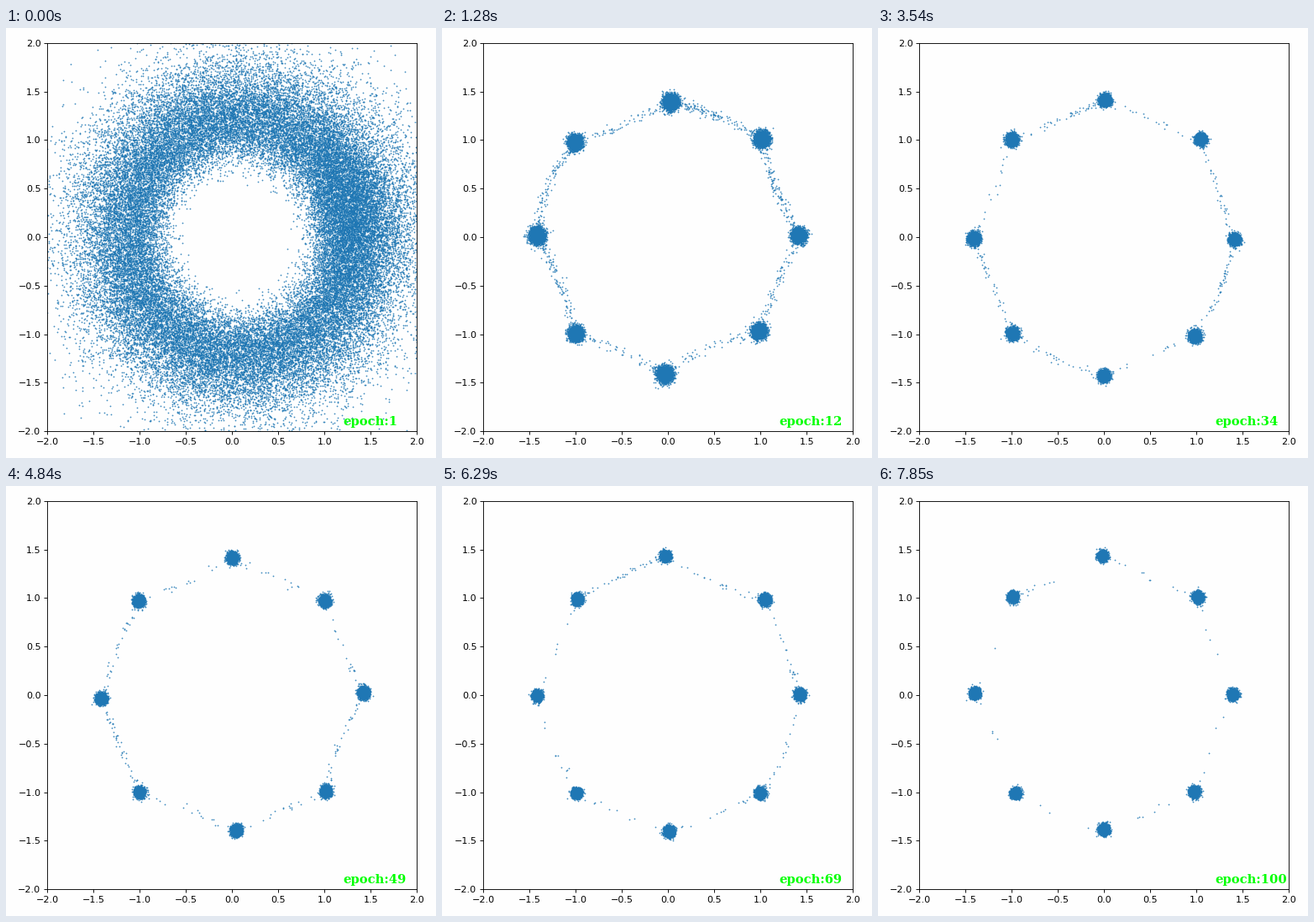
Animation, 512 px wide and 512 px high, one loop 8890 ms. Source, as a matplotlib script:

```python
import numpy as np
import matplotlib.pyplot as plt
from matplotlib.animation import FuncAnimation

SIZE, DPI = 512, 80
TICK_MS, LOOP_TICKS = 10, 889
LAST = 100
MODES, PER_MODE = 8, 2500

# The pace picks up from 12 to 4 ticks per epoch, then the last epoch holds.
holds = 12 - ((np.arange(1, LAST) + 4.2) // 11.86).astype(int)
holds = np.append(holds, LOOP_TICKS - holds.sum())
EPOCHS = np.repeat(np.arange(1, LAST + 1), holds)

angles = np.arange(MODES) * 2 * np.pi / MODES
RING = np.sqrt(2) * np.column_stack([np.cos(angles), np.sin(angles)])


def noisy_ring(rng, n=50000):
    """Untrained generator: a broad ring, denser on the right."""
    theta = rng.uniform(0, 2 * np.pi, n)
    dense = rng.random(n) < 0.1
    theta[dense] = rng.normal(0.22, 0.4, dense.sum())
    r = 1.31 * np.exp(rng.normal(0, 0.22, n))
    return np.column_stack([0.09 + r * np.cos(theta), r * np.sin(theta)])


def bridge(rng, a, b, n, width):
    """Stray points along the gap between two clusters."""
    u = rng.beta(*rng.uniform(0.6, 1.1, 2), n)[:, None]
    normal = np.array([b[1] - a[1], a[0] - b[0]]) / np.hypot(*(b - a))
    bow = rng.normal(0, 0.03) * np.sin(np.pi * u)
    return a + (b - a) * u + normal * bow + rng.normal(0, width, (n, 2))


def cloud(epoch):
    rng = np.random.default_rng(epoch)
    if epoch == 1:
        return noisy_ring(rng)
    spread = 0.024 + 0.014 * np.exp((12 - epoch) / 18)
    centers = RING + rng.normal(0, 0.018, RING.shape)
    strays = 1100 / epoch * np.exp(rng.normal(0, 0.6, MODES))
    parts = []
    for a, b, n in zip(centers, np.roll(centers, -1, axis=0), strays):
        size = spread * rng.uniform(0.95, 1.05)
        parts.append(rng.normal(a, size, (PER_MODE, 2)))
        parts.append(bridge(rng, a, b, int(n), 0.7 * spread))
    return np.vstack(parts)


fig = plt.figure(figsize=(SIZE / DPI, SIZE / DPI), dpi=DPI, facecolor="#fefefe")
ax = fig.add_axes([49.2 / SIZE, 31.8 / SIZE, 440 / SIZE, 462.4 / SIZE])
ticks = np.arange(-2, 2.1, 0.5)
ax.set(xlim=(-2, 2), ylim=(-2, 2), xticks=ticks, yticks=ticks)
ax.patch.set_visible(False)

# The tick labels never change: draw them once and keep them as a backdrop.
ax.spines[:].set_visible(False)
fig.canvas.draw()
fig.figimage(np.array(fig.canvas.buffer_rgba()), zorder=-1)
ax.spines[:].set_visible(True)
ax.xaxis.set_visible(False)
ax.yaxis.set_visible(False)

dots, = ax.plot([], [], ".", ms=1, color="C0")
label = ax.text(1.205, -1.9, "", color="lime", size=13.3, weight="bold",
                family="DejaVu Serif", va="center", zorder=5)

clouds = [cloud(e) for e in range(1, LAST + 1)]


def update(i):
    epoch = EPOCHS[i]
    dots.set_data(*clouds[epoch - 1].T)
    label.set_text(f"epoch:{epoch}")
    return dots, label


anim = FuncAnimation(fig, update, frames=LOOP_TICKS, interval=TICK_MS,
                     repeat=True, repeat_delay=0, blit=False)
plt.show()
```
